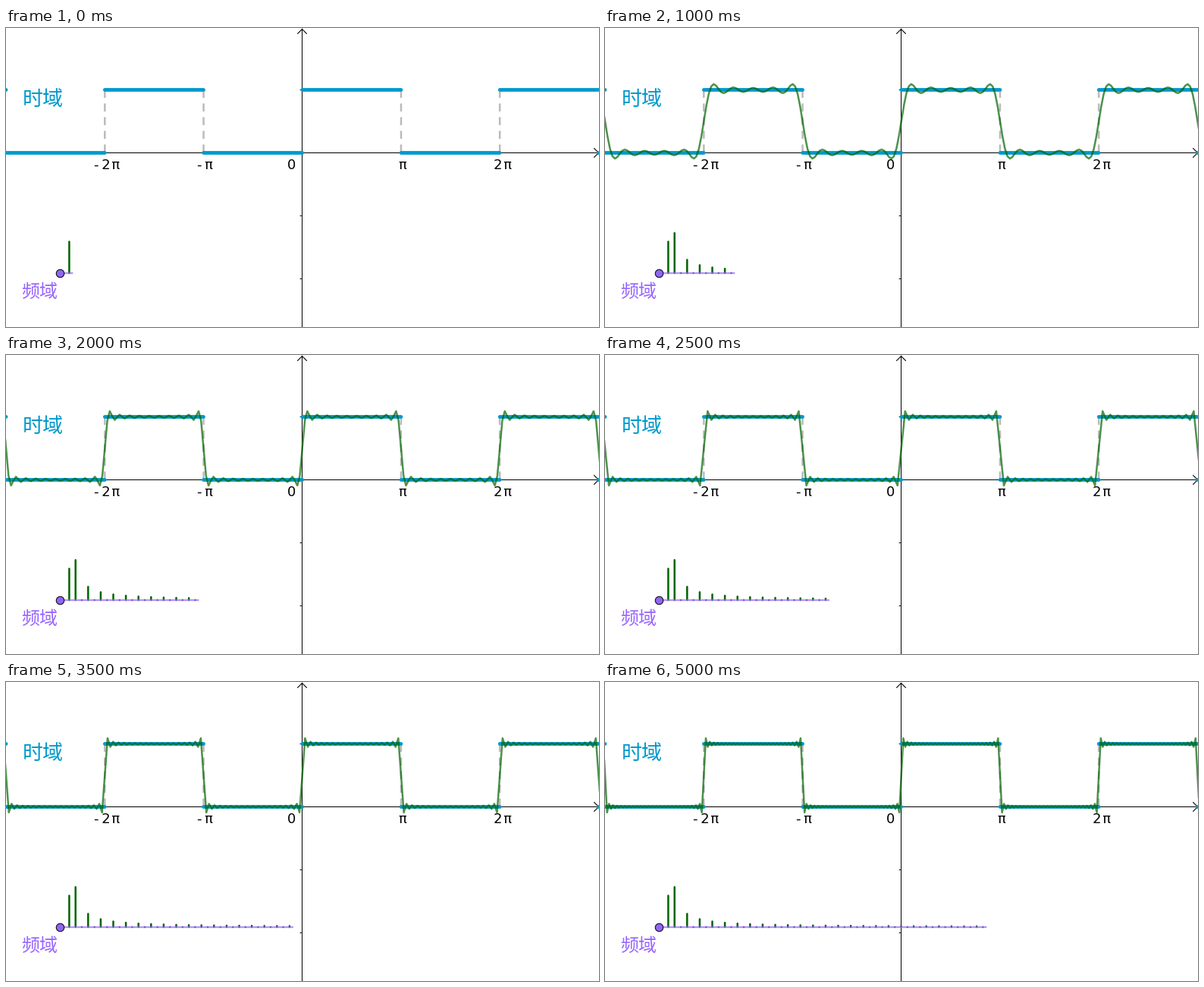
Animation, 782 px wide and 394 px high, one loop 5500 ms. Source, as a matplotlib script:

```python
import matplotlib.pyplot as plt
import numpy as np
from matplotlib.animation import FuncAnimation

W, H, DPI = 782, 394, 100
FRAMES, INTERVAL = 11, 500
AX, AY = 390.5, 164.5        # pixel centres of the axis lines
X0, UX, UY = 390.75, 41.45, 83  # graph origin and pixels per unit
BX, BY, STEP = 83.4, 323, 8.3   # first spectrum bar and bar spacing
PI = np.pi

BLUE, GREEN, PURPLE = "#0099cc", "#006400", "#9966ff"

plt.rcParams["path.simplify"] = False
plt.rcParams["path.snap"] = False


def pt(px):
    return px * 72 / DPI


def sx(x):
    return X0 + UX * np.asarray(x)


def sy(y):
    return AY - UY * np.asarray(y)


fig = plt.figure(figsize=(W / DPI, H / DPI), dpi=DPI, facecolor="white")
ax = fig.add_axes([0, 0, 1, 1])
ax.set_xlim(0, W)
ax.set_ylim(H, 0)
ax.axis("off")


def line(xs, ys, color, width, z, **kw):
    kw.setdefault("solid_capstyle", "round")
    return ax.plot(xs, ys, color=color, lw=pt(width), zorder=z, **kw)[0]


def label(x, y, text, size, color="black", font="DejaVu Sans"):
    ax.text(x, y, text, fontsize=pt(size), color=color, family=font,
            va="baseline", zorder=8)


def draw_axes():
    line([0, W], [AY, AY], "black", 1, 1)
    line([AX, AX], [1, H], "black", 1, 1)
    line([AX - 6, AX, AX + 6], [7.5, 1.5, 7.5], "black", 1.1, 1)
    line([775.5, 781.5, 775.5], [AY - 6, AY, AY + 6], "black", 1.1, 1)
    for v in (1, -1, -2):
        line([AX - 2.5, AX], [sy(v)] * 2, "black", 1, 1)
    for x, text in ((116.5, "-\u20092\u200aπ"), (251.5, "-\u2009π"),
                    (370.5, "0"), (517.5, "π"), (643, "2\u200aπ")):
        label(x, 186, text, 18)


def draw_square_wave():
    for k in range(-4, 4):
        level = 1 - k % 2
        xs = sx([k * PI, (k + 1) * PI])
        line(xs, [sy(level)] * 2, BLUE, 4.8, 3)
    for k in (-2, -1, 1, 2):
        line([sx(k * PI)] * 2, [sy(1), sy(0)], "#bbbbbb", 2.5, 2,
             dashes=(4.2, 3.0), dash_capstyle="butt")


def partial_sum(n):
    """Fourier sum up to harmonic n, sampled so every ripple peak is hit."""
    odd = np.arange(1, n + 1, 2)
    per_half = 2 * len(odd) * max(1, 24 // len(odd))
    x = np.arange(-4 * per_half, 4 * per_half + 1) * PI / per_half
    y = 0.5 + (2 / (PI * odd[:, None]) * np.sin(np.outer(odd, x))).sum(axis=0)
    return sx(x), sy(y)


def spectrum(n):
    """Bars for harmonics 0..n as one broken path; empty ones become dots."""
    xs, ys = [], []
    for k in range(n + 1):
        amp = 0.5 if k == 0 else 2 / (k * PI) * (k % 2)
        x = BX + k * STEP
        xs += [x, x, np.nan]
        ys += [BY, BY - max(UY * amp, 0.1), np.nan]
    return xs, ys


draw_axes()
draw_square_wave()
label(21.5, 102, "时域", 27, BLUE, "Noto Sans CJK JP")
label(20, 355.3, "频域", 24, PURPLE, "Noto Sans CJK JP")

curve = line([], [], GREEN, 2.5, 4, alpha=0.7, solid_joinstyle="round")
bars = line([], [], GREEN, 2.5, 5)
base = line([], [], PURPLE, 2.3, 6, alpha=0.7, solid_capstyle="butt")
ax.plot([71], [BY], "o", ms=pt(10.5), mfc="#8f66f5", mec="black",
        mew=pt(1), zorder=7)


def update(i):
    n = 5 * i
    curve.set_data(*(partial_sum(n) if n else ([], [])))
    bars.set_data(*spectrum(n))
    base.set_data([71, BX + (n + 0.6) * STEP], [BY, BY])
    return curve, bars, base


anim = FuncAnimation(fig, update, frames=FRAMES, interval=INTERVAL,
                     repeat=True, repeat_delay=0)
plt.show()
```
